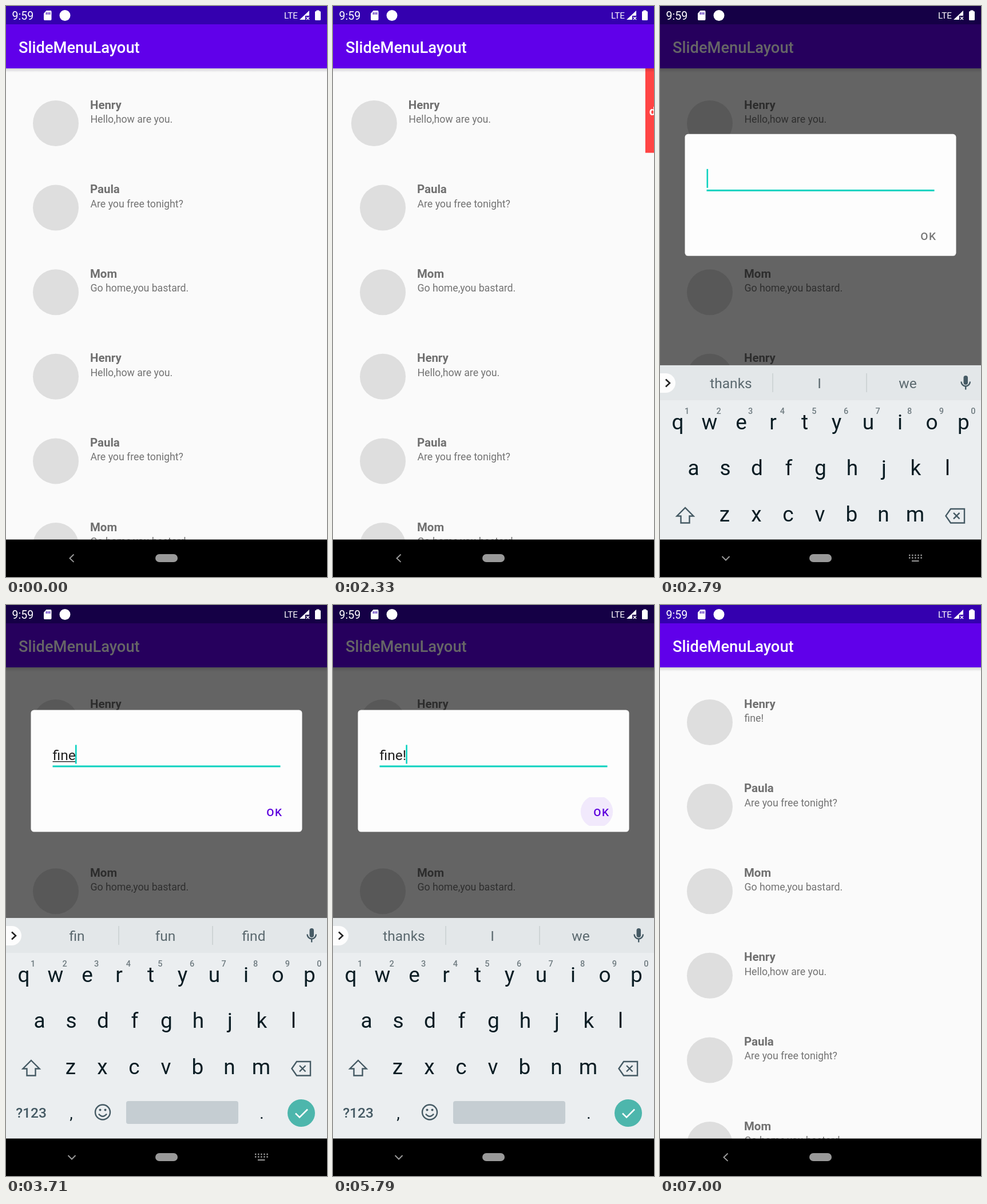
Write an HTML page that moves like this. It is 561x998 px and loops after 7040 ms.

```html
<!DOCTYPE html>
<html lang="en">
<head>
<meta charset="utf-8">
<title>SlideMenuLayout</title>
<style>
html, body { margin: 0; width: 100%; height: 100%; overflow: hidden; background: #fafafa; }
svg { display: block; width: 100%; height: 100%; font-family: Roboto, sans-serif; }
.mid { text-anchor: middle; }
.line { fill: none; stroke: #455a64; stroke-width: 2.4; }
.nav { fill: none; stroke: #999; stroke-width: 2; }
</style>
</head>
<body>
<svg id="stage" viewBox="0 0 561 998"></svg>
<script>
const LOOP = 7040, PITCH = 147.6, MENU = 70, LIFT = 192.5;

const text = (x, y, size, fill, str, extra = '') =>
  `<text x="${x}" y="${y}" font-size="${size}" fill="${fill}" ${extra}>${str}</text>`;
const rect = (x, y, w, h, fill, extra = '') =>
  `<rect x="${x}" y="${y}" width="${w}" height="${h}" fill="${fill}" ${extra}/>`;
const circle = (x, y, r, fill, extra = '') =>
  `<circle cx="${x}" cy="${y}" r="${r}" fill="${fill}" ${extra}/>`;
const path = (d, extra = 'class="line"') => `<path d="${d}" ${extra}/>`;

const people = [['Henry', 'Hello,how are you.'], ['Paula', 'Are you free tonight?'], ['Mom', 'Go home,you bastard.']];

const row = i => {
  const [name, msg] = people[i % 3];
  return `<g transform="translate(0 ${i * PITCH})"><g id="row${i}">` +
    circle(87, 205, 40, '#dedede') +
    text(147, 179.5, 20.4, '#6f6f6f', name, 'font-weight="700"') +
    text(147.5, 204, 17.7, '#737373', msg, `id="msg${i}"`) + '</g></g>';
};

const list = `<g clip-path="url(#body)">${[0, 1, 2, 3, 4, 5].map(row).join('')}
  <g id="menu">${rect(0, 109, MENU, PITCH, '#ff4444')}
  ${text(7, 190.5, 20, '#fff', 'delete', 'font-weight="700"')}</g></g>`;

const bars = rect(0, 109, 561, 7, 'url(#shade)') + rect(0, 32, 561, 77, '#6000ea') +
  rect(0, 0, 561, 32, '#3400af') +
  text(22, 82, 27.3, '#fff', 'SlideMenuLayout', 'font-weight="500"');

const status = text(10.5, 24, 19.6, '#fff', '9:59') +
  path('M70.500 8H78Q79.500 8 79.500 10V23Q79.500 25 78 25H67.500Q66 25 66 23V13Z', 'fill="#fff"') +
  path('M70.500 11v4M73.500 11v4M76.500 11v4', 'stroke="#3400af" stroke-width="1.400"') +
  circle(103, 16.5, 9.5, '#fff') +
  text(486, 22, 15.2, '#fff', 'LTE') +
  path('M530 8V17H523V24H513Z', 'fill="#fff"') +
  path('M525 19l5 5M530 19l-5 5', 'stroke="#fff" stroke-width="1.500"') +
  rect(540, 9, 10, 16, '#fff', 'rx="1.500"') + rect(542.5, 7.5, 5, 3, '#fff');

const dialog = `<g id="dialog">${rect(43.5, 376, 474, 213, '#fdfdfd', 'rx="5.500"')}
  ${rect(81.5, 473, 398, 3, '#0dd2c0')}
  ${text(81.5, 463.5, 24.6, '#202020', '', 'id="field"')}
  ${rect(81.5, 465.5, 0, 1.4, '#202020', 'id="compose"')}
  ${rect(81.5, 437, 2.6, 33, '#0dd2c0', 'id="cursor"')}
  <g clip-path="url(#button)">${circle(461, 553.5, 0, '#6200ee', 'id="ripple" opacity=".08"')}</g>
  ${text(455.3, 561, 19.1, '#777', 'OK', 'id="ok" font-weight="500" letter-spacing="1.400"')}</g>`;

const keys = (letters, x, y) => [...letters].map((c, i) =>
  text(x + 55.5 * i, y, 37, '#0b1d24', c, 'class="mid"')).join('');
const hints = [...'1234567890'].map((c, i) =>
  text(47 + 55.6 * i, 632, 14.5, '#6f7b80', c, 'class="mid" font-weight="500"')).join('');

const keyboard = `<g id="keyboard">${rect(0, 547, 561, 386, '#ebeef0')}${rect(0, 547, 561, 61, '#e3e7e9')}
  ${rect(-30, 561, 57, 34, '#fdfdfd', 'rx="17"')}
  ${path('M10 571.500l7 6.500-7 6.500', 'fill="none" stroke="#222" stroke-width="2.600"')}
  ${rect(196.4, 561, 1.2, 33, '#c2c8cb')}${rect(360.4, 561, 1.2, 33, '#c2c8cb')}
  ${[124, 278.5, 433].map((x, i) => text(x, 587, 24.5, '#5b696f', '', `id="hint${i}" class="mid"`)).join('')}
  ${rect(530.5, 565, 7.5, 16, '#455a64', 'rx="3.750"')}
  ${path('M526.500 575.500a7.700 8 0 0 0 15.400 0M534.200 584v5.500')}
  ${hints}${keys('qwertyuiop', 31, 659)}${keys('asdfghjkl', 58.5, 739)}${keys('zxcvbnm', 113, 820)}
  ${path('M44 796L58.500 810.500H51.500V822.500H36.500V810.500H29.500Z')}
  ${path('M508 798H532V822.500H508L499.500 810.200ZM513 805l10.500 10.500M523.500 805l-10.500 10.500')}
  ${text(44, 896, 24.5, '#455a64', '?123', 'class="mid" font-weight="500"')}
  ${text(114, 898, 28, '#0b1d24', ',', 'class="mid"')}${text(447, 898, 28, '#0b1d24', '.', 'class="mid"')}
  ${path('M156 886.500a13 13 0 1 0 26 0a13 13 0 1 0-26 0M162 889.500q7 8.500 14 0')}
  ${circle(164.5, 882.5, 2, '#455a64')}${circle(173.5, 882.5, 2, '#455a64')}
  ${rect(210, 867, 196, 40, '#c5cdd2', 'rx="4"')}
  ${circle(516, 888, 24, '#4db6ac')}
  ${path('M506 888.500l7 7 14-14', 'fill="none" stroke="#fff" stroke-width="2.600"')}</g>`;

const dots = [960, 964.5].map(y => path(`M435 ${y}h23`,
  'stroke="#999" stroke-width="2.400" stroke-dasharray="2.400 2.700"')).join('');
const nav = rect(0, 932.5, 561, 66, '#000') + rect(261, 958, 39, 14, '#999', 'rx="7"') +
  path('M118.500 958.500l-7 6.700 7 6.700', 'id="back" class="nav"') +
  path('M108.500 962l6.500 6.500 6.500-6.500', 'id="down" class="nav"') +
  `<g id="ime">${dots}${path('M440 970h12.500', 'class="nav"')}</g>`;

document.getElementById('stage').innerHTML = `<defs>
  <clipPath id="body">${rect(0, 109, 561, 824, '#000')}</clipPath>
  <clipPath id="button">${rect(425, 528.5, 87, 50, '#000', 'rx="5"')}</clipPath>
  <linearGradient id="shade" x2="0" y2="1"><stop stop-opacity=".16"/><stop offset="1" stop-opacity="0"/></linearGradient>
  </defs>${rect(0, 0, 561, 998, '#fafafa')}${list}${bars}
  ${rect(0, 0, 561, 998, '#000', 'id="dim"')}${status}${dialog}${keyboard}${nav}`;

const $ = id => document.getElementById(id);
const set = (id, attrs) => { for (const k in attrs) $(id).setAttribute(k, attrs[k]); };
const show = (id, on) => set(id, { visibility: on ? 'visible' : 'hidden' });
const ease = (t, from, to) => {
  const u = Math.min(1, Math.max(0, (t - from) / (to - from)));
  return u * u * (3 - 2 * u);
};

const strokes = [3000, 3200, 3400, 3600, 4540];

function draw(t) {
  const slide = MENU * (ease(t, 1300, 1600) - ease(t, 2210, 2383));
  set('row0', { transform: `translate(${-slide} 0)` });
  set('menu', { transform: `translate(${561 - slide} 0)` });
  $('msg0').textContent = t < 5850 ? people[0][1] : 'fine!';

  const open = ease(t, 2390, 2490), shut = ease(t, 5850, 5990);
  const up = ease(t, 2650, 2850), keysUp = up - ease(t, 5850, 6050);
  const scale = 0.9 + 0.1 * open;
  set('dim', { opacity: 0.6 * (open - shut) });
  set('dialog', {
    opacity: open - shut,
    transform: `translate(0 ${-LIFT * up}) translate(280.5 482.5) scale(${scale}) translate(-280.5 -482.5)`
  });
  set('keyboard', { transform: `translate(0 ${386 * (1 - keysUp)})` });

  const count = strokes.filter(s => t >= s).length;
  $('field').textContent = 'fine!'.slice(0, count);
  const width = count ? $('field').getComputedTextLength() : 0;
  const since = t - (strokes[count - 1] || 2390);
  set('cursor', { x: 81.5 + width - (count ? 0.8 : 0) });
  show('cursor', since % 1000 < 500);
  set('compose', { width: count < 5 ? width : 0 });
  set('ok', { fill: count ? '#5c00dd' : '#777' });
  set('ripple', { r: t < 5750 ? 0 : 20 + (t - 5750) * 0.2 });

  const words = count > 0 && count < 5 ? ['fin', 'fun', 'find'] : ['thanks', 'I', 'we'];
  words.forEach((w, i) => { $('hint' + i).textContent = w; });

  show('back', keysUp <= 0);
  show('down', keysUp > 0);
  show('ime', keysUp > 0 && t < 5780);
}

const start = performance.now();
function tick() {
  draw((performance.now() - start) % LOOP);
  requestAnimationFrame(tick);
}
tick();
</script>
</body>
</html>
```
